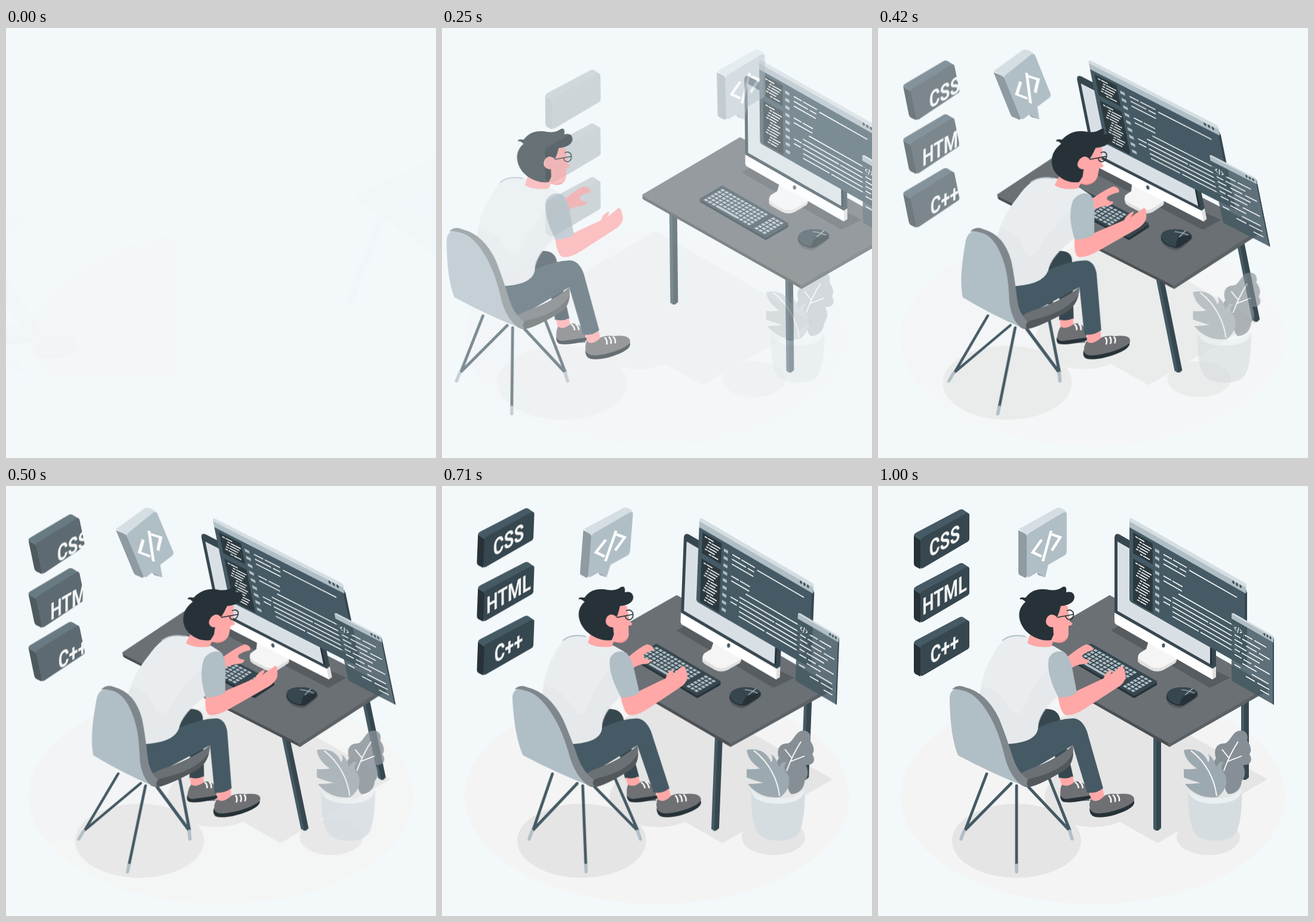
These frames come from a looping animation (720x720 px, 1040 ms). An HTML page:

```html
<!DOCTYPE html>
<html lang="en">
<head>
<meta charset="utf-8">
<title>Developer at work</title>
<style>
html, body { margin: 0; width: 100%; height: 100%; overflow: hidden; background: #f3f8fb; }
svg { display: block; width: 100vw; height: 100vh; }
.fade, .up, .from-right, .from-left, .speed-right, .speed-left {
  animation: 1s cubic-bezier(.36, -.01, .5, 1.38) both paused;
}
.fade { animation-name: fade; }
.up { animation-name: up; }
.from-right { animation-name: from-right; }
.from-left { animation-name: from-left; }
.speed-right { animation-name: speed-right; }
.speed-left { animation-name: speed-left; }
@keyframes fade { from { opacity: 0; } to { opacity: 1; } }
@keyframes up { from { opacity: 0; transform: translateY(43.2px); } to { opacity: 1; transform: none; } }
@keyframes from-right { from { opacity: 0; transform: translateX(43.2px); } to { opacity: 1; transform: none; } }
@keyframes from-left { from { opacity: 0; transform: translateX(-43.2px); } to { opacity: 1; transform: none; } }
@keyframes speed-right {
  from { opacity: 0; transform: translateX(360px) skewX(-20deg); }
  60% { opacity: 1; transform: translateX(0) skewX(10deg); }
  80% { opacity: 1; transform: translateX(0) skewX(-2deg); }
  to { opacity: 1; transform: translateX(0) skewX(0deg); }
}
@keyframes speed-left {
  from { opacity: 0; transform: translateX(-360px) skewX(20deg); }
  60% { opacity: 1; transform: translateX(0) skewX(-10deg); }
  80% { opacity: 1; transform: translateX(0) skewX(2deg); }
  to { opacity: 1; transform: translateX(0) skewX(0deg); }
}
#desk { transform-origin: 0 315px; }
#man { transform-origin: 0 408px; }
.bubble { transform-origin: 0 95px; }
.label { font: 700 38px Roboto, Arial, sans-serif; fill: #f5f5f5; text-anchor: middle; }
.line { fill: none; stroke: #fff; stroke-width: 1.8; }
.round { stroke-linejoin: round; stroke-linecap: round; }
.skin { fill: #ffa8a7; }
.ink { fill: #263238; }
.slate { fill: #455a64; }
.deep { fill: #37474f; }
.mist { fill: #b0bec5; }
.shade { fill: #e5e5e5; }
</style>
</head>
<body>
<svg viewBox="0 0 720 720">
  <ellipse class="fade" cx="360" cy="520" rx="322" ry="180" fill="#f4f4f4"/>

  <g class="from-left shade">
    <path d="M207 445 388 340 652 491 468 598 408 564 Z"/>
    <ellipse cx="360" cy="521" rx="81" ry="50"/>
    <ellipse cx="232" cy="594" rx="108" ry="62"/>
    <ellipse cx="553" cy="588" rx="53" ry="30"/>
  </g>

  <g id="desk" class="speed-right">
    <g id="deskLegs"></g>
    <path class="round" fill="#4b4f52" stroke="#4b4f52" stroke-width="5" d="M226 280 488 430V434L226 285Z"/>
    <path class="round" fill="#5b6164" stroke="#5b6164" stroke-width="5" d="M488 430 651 336V341L488 434Z"/>
    <path class="round" fill="#6b7075" stroke="#6b7075" stroke-width="6" d="M227 280 388 186 649 335 488 428Z"/>
    <path fill="#575c60" d="M390 242 406 232 590 321 556 338Z"/>

    <path fill="#e0e0e0" d="M435 286V293Q436 296 441 299L457 308Q467 313 478 308L497 297Q501 294 500 288Z"/>
    <path fill="#f5f5f5" d="M453 260 449 273 438 280Q432 287 440 292L458 303Q467 307 477 303L497 292Q503 287 496 283L485 276V272Z"/>

    <path class="deep" d="M396 86Q397 78 404 81L562 172Q566 175 566 181V309L396 213Z"/>
    <path fill="#d9e0e5" d="M401 93 556 182V298L401 209Z"/>
    <path class="ink" d="M556 182 559 181V300L556 298Z"/>
    <path fill="#fff" d="M396 212 560 306V324L399 232Q396 230 396 226Z"/>
    <path fill="#e0e0e0" d="M560 306 566 302V320L560 324Z"/>
    <ellipse class="slate" cx="478" cy="267" rx="2.6" ry="3.6"/>

    <path class="round ink" stroke="#263238" stroke-width="4" d="M321 290 429 353 465 332V328L357 267Z"/>
    <path class="round deep" stroke="#37474f" stroke-width="4" d="M321 287 357 266 465 328 429 349Z"/>
    <path id="keys" class="mist"/>

    <path fill="#54595d" d="M482 354Q485 371 505 372Q514 371 537 351L520 340Z"/>
    <path class="ink" d="M483 351Q485 338 508 337Q530 337 535 346Q536 352 528 357L512 367Q504 370 496 366Q482 361 483 351Z"/>
    <path class="deep" d="M484 348Q490 337 508 337Q530 337 535 346L514 350Q507 355 505 366Q484 363 484 348Z"/>
    <path class="line" style="stroke:#b0bec5;stroke-width:1.2" d="M508 341Q520 342 530 347M514 350 527 339"/>

    <g id="editor" transform="matrix(1 .57 0 1 421 58)">
      <rect class="slate" y="3" width="196" height="132" rx="4"/>
      <path class="deep" d="M193 8H197V132H193Z"/>
      <path class="mist" d="M0 11V2Q0 -4 4 -4L195 -5V11Z"/>
      <path fill="#d5dee2" d="M0 1Q0 -6 5 -6L192 -6 196 -3V1Z"/>
      <g class="deep"><ellipse cx="174" cy="4" rx="1.8" ry="2.6"/><ellipse cx="180" cy="4" rx="1.8" ry="2.6"/><ellipse cx="186" cy="4" rx="1.8" ry="2.6"/></g>
      <path class="ink" opacity=".8" d="M6 16H39V51H6ZM6 60H39V132H6Z"/>
      <path id="menu" class="line"/>
      <path id="ticks" class="mist"/>
      <path id="code" class="line"/>
    </g>

    <g transform="matrix(1 .57 0 1 592 213)">
      <rect class="slate" width="71" height="113" rx="3" opacity=".86"/>
      <path class="deep" d="M69 5H71V113H69Z"/>
      <path class="mist" d="M0 9V2Q0 -1 3 -1H70V9Z"/>
      <path fill="#d5dee2" d="M0 1 3 -2H68L71 1Z"/>
      <g class="deep"><ellipse cx="55" cy="4" rx="1.5" ry="2.2"/><ellipse cx="60" cy="4" rx="1.5" ry="2.2"/><ellipse cx="65" cy="4" rx="1.5" ry="2.2"/></g>
      <path class="line" style="stroke-width:1.2" d="M8 19 5 22 8 25M12 17 10 27M14 19 17 22 14 25M20 25h1M23 25h1"/>
      <path id="popup" class="line"/>
    </g>
  </g>

  <g class="from-right">
    <path fill="#868f95" d="M587 516C576 507 584 488 577 480C564 475 559 463 566 456C561 441 567 431 580 431C589 430 592 414 603 410C616 407 621 417 618 426C623 433 627 442 622 449C629 461 622 468 611 467C618 482 612 490 609 494C608 507 600 515 587 516Z"/>
    <path class="line" d="M579 477Q589 449 603 428M576 441 588 456M586 461 609 452"/>
    <path fill="#9da9b0" d="M512 442C530 438 547 445 553 463Q557 457 553 449Q563 456 566 471Q572 459 579 463Q572 469 577 478C589 490 583 511 568 521C548 523 529 518 514 499Q528 499 540 497Q524 493 512 488V474Q524 475 534 473Q514 460 512 442Z"/>
    <path class="line" d="M524 443C550 463 564 492 567 519"/>
    <path fill="#d6dde1" d="M519.5 510C519 546 523 576 534 585C548 597 582 597 596 585C606 575 609.5 546 609.5 510Q595 524 564 524Q533 524 519.5 510Z"/>
    <path fill="#eaeff1" d="M519.5 508Q521 531 564 532Q608 531 609.5 508L604 511Q591 524 567 523Q538 525 524 513Z"/>
  </g>

  <g class="bubble speed-right"><g class="bubble speed-right">
    <path fill="#8f9ba2" d="M235 74 249 81V152Q247 155 243 152L237 149Q235 148 235 144Z"/>
    <path fill="#d5dee2" d="M236 72 299 37Q304 35 309 38L315 42 251 84Z"/>
    <path class="mist" d="M249 86Q249 82 253 79L309 45Q316 41 316 47V109Q316 114 311 117L285 132 280 153 266 145 254 152Q249 154 249 149Z"/>
    <path fill="#8f9ba2" d="M266 145 268 149 280 153Z"/>
    <path fill="none" stroke="#fff" stroke-width="4.5" d="M274 90 259 111 274 118M290 75 276 126M291 81 305 86 291 108"/>
  </g></g>

  <g id="cards" class="up"></g>

  <g id="man" class="speed-left">
    <path class="deep" d="M268 405Q268 378 276 373Q298 371 304 387L327 487Q314 493 303 489L292 430Z"/>
    <path class="skin" d="M304 488Q315 492 326 486L329 500Q319 508 308 502Z"/>
    <path fill="#6f7073" d="M308 500Q317 506 330 495Q341 492 354 508V527L312 528Q303 524 306 505Z"/>
    <path class="ink" d="M305 517Q307 524 316 524L357 518V523Q328 532 311 529Q305 527 305 517Z"/>
    <path class="line" style="stroke-width:2.5" d="M330 496Q335 499 336 506M337 495Q342 498 343 506"/>

    <g id="chairLegs" class="round" fill="none"></g>

    <path class="skin" d="M354 511Q366 513 376 506L379 520Q370 532 357 526Z"/>
    <path fill="#6f7073" d="M356 524Q366 533 380 518Q389 514 401 516C416 514 430 516 429 526C428 538 390 553 367 552Q355 552 354 533Z"/>
    <path class="ink" d="M354 539Q358 550 374 548C394 546 421 537 429 527Q431 535 418 542C401 551 377 557 363 554Q354 552 354 539Z"/>
    <path class="line" style="stroke-width:2.5" d="M386 518Q391 522 390 530M393 517Q398 521 397 529M400 517Q405 520 404 528"/>

    <path fill="#f5f5f5" d="M293 340Q282 358 277 373Q305 374 307 388L316 386Z" opacity=".6"/>
    <path class="slate" d="M212 429Q255 423 270 404Q300 390 327 389Q342 390 350 411L377 506Q365 516 350 513L326 434L236 488Q220 461 212 429Z"/>
    <path fill="#6b7075" d="M230 488Q246 476 262 471Q302 456 326 434Q330 454 317 466Q300 481 270 490L240 500Z"/>
    <path fill="#53585c" d="M240 500Q247 491 262 488Q314 475 327 446Q327 466 312 476Q276 498 258 503Q246 506 240 500Z"/>

    <path class="skin" d="M315 288Q336 270 349 265Q361 268 360 275Q349 277 342 283Q341 290 354 291Q354 297 345 298Q332 299 324 305Z"/>
    <path fill="#e9edef" d="M247 251C220 246 205 258 193 282Q173 314 170 352L218 432C247 430 268 422 268 403C269 381 290 361 302 350L311 278Q280 258 247 251Z"/>
    <path fill="#e1e6e8" d="M175 335Q200 340 215 362Q236 402 250 358Q264 330 283 307L302 352Q270 380 268 406Q262 430 218 431L170 351Z" opacity=".5"/>
    <path fill="none" stroke="#b0bec5" stroke-width="2" d="M208 259Q221 247 247 252"/>

    <path class="skin" d="M301 350 333 343 378 322Q380 312 391 307Q392 312 388 317L405 303Q408 299 411 304Q416 317 414 323Q410 333 400 338L346 373Q326 386 313 383Q305 378 301 350Z"/>
    <path class="mist" d="M286 288Q296 272 313 279Q323 288 328 320L333 346Q319 355 302 354C291 332 282 310 286 288Z"/>

    <path class="mist" d="M120 358Q119 341 134 339Q172 343 196 385Q210 411 222 452Q230 488 244 502Q190 481 134 451Q121 420 120 358Z"/>
    <path fill="#7f878c" d="M124 341Q132 331 146 337Q182 346 203 390Q214 417 226 455Q233 478 251 492Q247 499 252 503L242 502Q224 490 214 460C206 428 200 408 187 385Q165 346 140 342Q130 339 124 341Z"/>

    <path class="skin" d="M297 203Q311 192 318 203L321 226 326 231Q324 234 319 234V249Q317 262 302 262L293 261 290 269Q263 272 250 263L257 240Z"/>
    <path fill="#f28f8f" d="M291 260Q309 264 318 253Q314 263 302 263Z"/>
    <path class="ink" d="M247 194Q241 188 238 190Q236 185 247 187C258 172 273 171 287 174Q301 176 309 169Q317 166 315 178Q328 175 329 186C328 197 316 200 306 201Q304 210 301 217L293 231 294 249 290 258C272 261 255 251 246 241C234 226 232 207 247 194Z"/>
    <path class="skin" d="M299 219Q290 211 283 220Q278 230 286 235Q294 239 299 233Z"/>
    <g fill="none" stroke="#263238" stroke-width="1.7"><path d="M300 220 327 215M316 209Q323 205 327 212Q329 221 322 224Q315 224 314 217"/></g>
  </g>
</svg>
<script>
const $ = id => document.getElementById(id);
const put = (id, html) => { $(id).innerHTML = html; };
const rows = list => list.map(([x, y, w]) => `M${x} ${y}h${w}`).join('');
const range = n => [...Array(n).keys()];

// Desk legs: x, top, bottom
put('deskLegs', [[268, 300, 463], [608, 350, 492], [461, 415, 577]].map(([x, a, b]) =>
  `<path class="deep" d="M${x} ${a}H${x + 13}V${b - 4}L${x + 8} ${b}H${x + 4}L${x} ${b - 4}Z"/>
   <path class="slate" d="M${x} ${a}H${x + 5}V${b}L${x} ${b - 3}Z"/>`).join(''));

// Keyboard grid along the two table directions
const key = (u, v) => `${(357 + 108 * u - 36 * v).toFixed(1)} ${(267 + 61 * u + 21 * v).toFixed(1)}`;
let keys = '';
for (let r = 0; r < 6; r++) {
  for (let c = 0; c < 16; c++) {
    if (c === 12) continue;
    const u = .02 + c * .06, v = .05 + r * .155;
    const wide = r === 5 && c > 2 && c < 8 ? .06 : .043;
    keys += `M${key(u, v)}L${key(u + wide, v)}L${key(u + wide, v + .105)}L${key(u, v + .105)}Z`;
  }
}
$('keys').setAttribute('d', keys);

// Sidebar entries, gutter marks and code rows
const menu = (y, n) => rows(range(n).flatMap(i => {
  const x = 10 + i * 7 % 9;
  return [[x, y + i * 5, 4], [x + 5, y + i * 5, 10 + i * 5 % 6]];
}));
$('menu').setAttribute('d', menu(21, 6) + menu(65, 13));
$('ticks').setAttribute('d', range(9).map(i => `M43 ${22 + i * 12.3}h7v5h-7Z`).join(''));
$('code').setAttribute('d', rows([
  [57, 24, 14], [73, 24, 23], [57, 32, 24], [84, 32, 11], [100, 26, 80],
  [57, 40, 37], [57, 60, 13], [72, 60, 17], [57, 68, 31],
  [82, 76, 98], [57, 95, 13], [72, 87, 108], [57, 103, 11], [72, 95, 60], [134, 95, 46],
  [72, 103, 108], [72, 111, 108], [72, 119, 44], [119, 119, 61]
]));
$('popup').setAttribute('d', rows([
  [22, 24, 13], [38, 24, 20], [5, 33, 10], [18, 33, 30], [5, 41, 13], [24, 41, 18], [46, 41, 18],
  [5, 49, 20], [29, 49, 24], [5, 57, 9], [17, 57, 30], [38, 66, 26], [5, 66, 12], [20, 66, 13],
  [18, 74, 24], [5, 83, 10], [34, 83, 28], [24, 92, 15], [43, 92, 20], [48, 101, 15]
]));

// Language cards
put('cards', ['CSS', 'HTML', 'C++'].map((name, i) => {
  const y = i * 90;
  return `<g class="speed-right" style="transform-origin:0 ${89 + y}px"><g transform="translate(0 ${y})">
    <path class="ink" d="M60 83 71 89V139L63 135Q60 133 60 129Z"/>
    <path class="slate" d="M60 84Q60 80 64 78L136 40Q140 38 143 40L152 46 71 91Z"/>
    <path class="deep" d="M71 92Q71 88 75 86L148 46Q153 44 153 49V88Q153 92 149 94L76 137Q71 140 71 135Z"/>
  </g></g>
  <text class="label" transform="matrix(.72 -.415 0 1 111.5 ${105.5 + y})">${name}</text>`;
}).join(''));

// Chair legs with pale tips
const legs = 'M182 482 146 576M223 498 147 575M232 502V635M252 504 320 576M286 488 321 576';
const tips = 'M144 578 139 591M232 635V646M321 578 325 591';
put('chairLegs', `<path stroke="#455a64" stroke-width="4.8" d="${legs}"/><path stroke="#b0bec5" stroke-width="5.5" d="${tips}"/>`);

// The clock advances in film steps of 1/24 s
const LOOP = 1040, STEP = 1000 / 24, LEAD = 32.5, FIRST = 45;
const moves = document.getAnimations();
const start = performance.now();
function draw() {
  const now = Math.max(0, performance.now() - start) % LOOP;
  const step = Math.floor((now + 4) / STEP);
  const time = step < 2 ? FIRST : Math.min(1000, step * STEP + LEAD);
  for (const move of moves) move.currentTime = time;
  requestAnimationFrame(draw);
}
draw();
</script>
</body>
</html>
```
